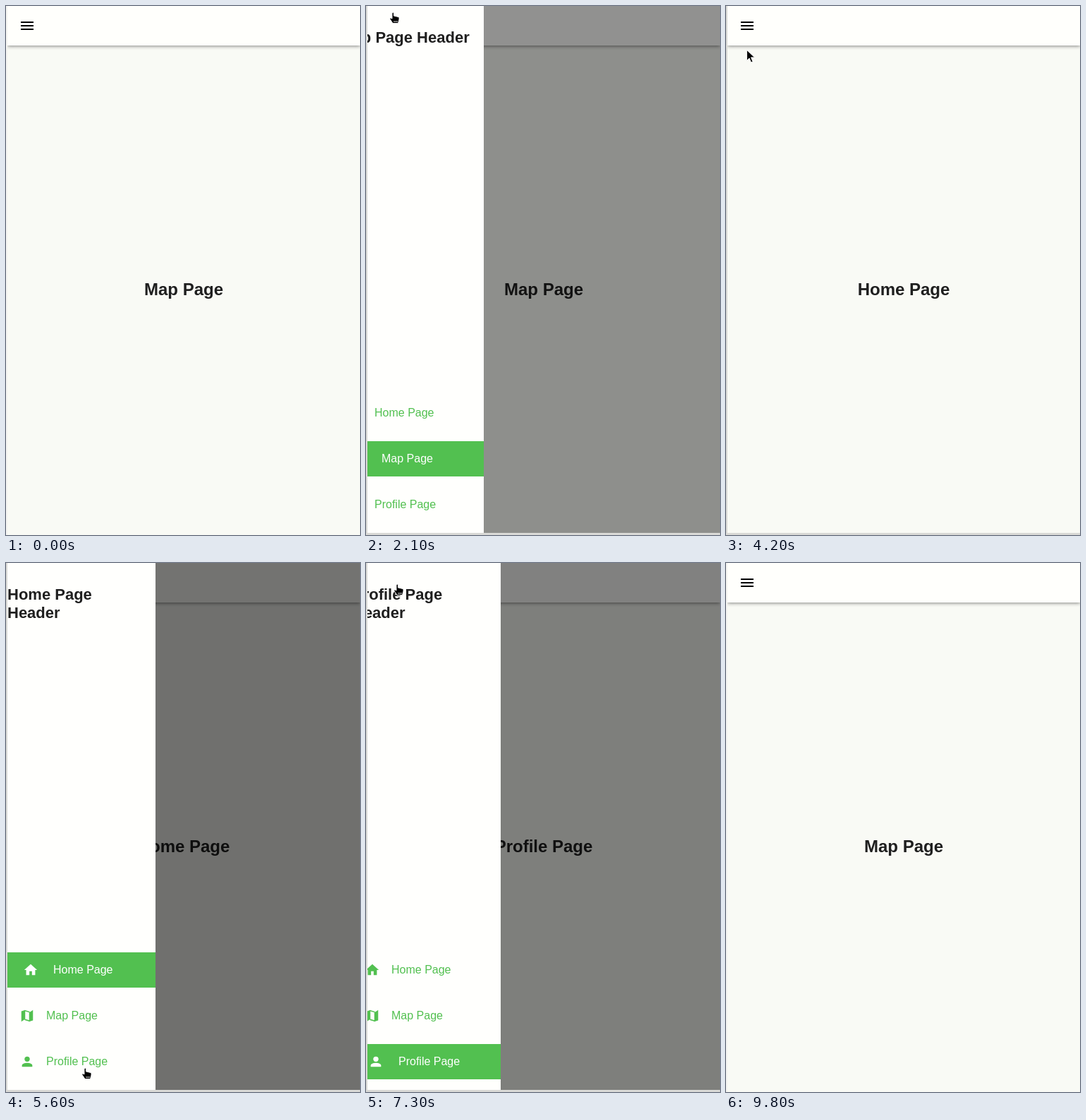
Recreate the animation shown at these times as an HTML page. Size 502x750 px, loop 10 s.

```html
<!DOCTYPE html>
<html lang="en">
<head>
<meta charset="utf-8">
<title>Side menu</title>
<style>
html, body { margin: 0; width: 100%; height: 100%; overflow: hidden; }
body { background: #f3f3f0; font-family: "Liberation Sans", Arial, sans-serif; color: #1f1f1f; }
body.framed { background: #d9d9d6; }
#app { position: absolute; left: 2px; top: 0; width: 500px; height: 750px; overflow: hidden; background: #f9faf5; }
.framed #app { height: 747px; }
#bar { position: absolute; width: 100%; height: 56px; background: #fffffc; box-shadow: 0 1px 5px rgba(0,0,0,.48); }
#bar i { position: absolute; left: 19px; width: 18px; height: 2px; background: #000; }
#title { position: absolute; top: 388px; width: 100%; text-align: center; font-weight: bold; font-size: 24px; line-height: 28px; }
#shade { position: absolute; inset: 0; background: #000; }
#drawer { position: absolute; width: 210px; height: 100%; background: #fffffd; }
#head { position: absolute; top: 31.5px; width: 196px; display: flex; justify-content: center; font-weight: bold; font-size: 22px; line-height: 26px; }
.item { position: absolute; width: 100%; height: 50px; font-size: 16px; line-height: 50px; color: #52c050; }
.item svg { position: absolute; left: 16.5px; top: 14px; width: 22px; height: 22px; fill: currentColor; }
.item span { position: absolute; left: 55px; white-space: nowrap; }
.item.on { background: #52c050; color: #fff; }
.on svg { margin-left: 5px; }
.on span { margin-left: 10px; }
#cursor { position: absolute; left: 0; top: 0; overflow: visible; width: 1px; height: 1px; }
</style>
</head>
<body>
<div id="app">
  <div id="bar"><i style="top:22px"></i><i style="top:27px"></i><i style="top:32px"></i></div>
  <div id="title"></div>
  <div id="shade"></div>
  <div id="drawer"><div id="head"></div></div>
</div>
<svg id="cursor" stroke="#fff" stroke-width=".9">
  <path id="arrow" d="M0 0V15L3.5 11.5L6 17.5L8.5 16.5L6 10.5H11Z"/>
  <g id="hand">
    <path d="M-1 1Q0-1 1.500 1V5L8 6.500Q9.500 7 9 10L7.500 15.500H0L-4 9.500Q-4.500 7-1 9Z"/>
    <path d="M1 13H7"/>
  </g>
</svg>
<script>
const LOOP = 10000, STEP = 100, SLIDE = 370, WIDTH = 210;
const ENTER = 500, LEAVE = 9800;
const $ = id => document.getElementById(id);
const clamp = k => Math.min(1, Math.max(0, k));

const icons = {
  Home: '<path d="M10 20v-6h4v6h5v-8h3L12 3 2 12h3v8z"/>',
  Map: '<path d="M3 5l6-2v14l-6 4zM15 7l6-4v16l-6 2z"/><path d="M8 3l8 2.500v1.500l-8-2.500zM8 16.500l8 2.500v2l-8-2.500z"/>',
  Profile: '<circle cx="12" cy="8" r="4"/><path d="M4 20v-2c0-5.300 16-5.300 16 0v2z"/>'
};
const pages = Object.keys(icons);
const itemTop = page => 552 + 65 * pages.indexOf(page);
const items = pages.map(page => {
  const el = document.createElement('div');
  el.className = 'item';
  el.style.top = itemTop(page) + 'px';
  el.innerHTML = `<svg viewBox="0 0 24 24">${icons[page]}</svg><span>${page} Page</span>`;
  $('drawer').append(el);
  return el;
});

// each visit opens the menu at one point, then picks a page
const visits = [
  { open: 1988, pick: 3380, page: 'Home', menu: [38, 9] },
  { open: 4780, pick: 5897, page: 'Profile', menu: [21, 8] },
  { open: 7141, pick: 8180, page: 'Map', menu: [44, 30] }
];

// the pointer heads for the menu after a pick, and for an item after opening
const moves = visits.flatMap(({ open, page, menu }, i) => [
  { start: i ? visits[i - 1].pick + 210 : ENTER, span: 880, to: menu },
  { start: open + 200, span: 620, to: [112, itemTop(page) + 34] }
]);

// cubic-bezier(.25, .8, .25, 1)
function ease(x) {
  if (x <= 0 || x >= 1) return clamp(x);
  const curve = (a, b, s) => 3 * a * s * (1 - s) ** 2 + 3 * b * s * s * (1 - s) + s ** 3;
  let s = .5;
  for (let half = .25; half > 1e-6; half /= 2) s += curve(.25, .25, s) < x ? half : -half;
  return curve(.8, 1, s);
}

function pointerAt(t) {
  return moves.reduce((from, { start, span, to }) => {
    const k = 1 - (1 - clamp((t - start) / span)) ** 2;
    return from.map((v, i) => v + (to[i] - v) * k);
  }, [500, 110]);
}

function draw(t) {
  let open = 0, page = 'Map';
  for (const v of visits) {
    open += ease((t - v.open) / SLIDE) - ease((t - v.pick) / SLIDE);
    if (t >= v.pick) page = v.page;
  }
  document.body.className = t >= 1800 && t < LEAVE ? 'framed' : '';
  $('title').textContent = page + ' Page';
  $('head').textContent = page + ' Page Header';
  items.forEach((el, i) => el.classList.toggle('on', pages[i] === page));
  $('shade').style.opacity = .55 * open;
  $('drawer').style.transform = `translateX(${Math.round((open - 1) * WIDTH)}px)`;

  const [x, y] = pointerAt(t);
  const hand = (x < 54 && y < 48) || (open > .5 && y > 550);
  $('cursor').style.display = t >= ENTER && t < LEAVE ? 'block' : 'none';
  $('cursor').style.transform = `translate(${x}px, ${y}px)`;
  $('hand').style.display = hand ? '' : 'none';
  $('arrow').style.display = hand ? 'none' : '';
}

const began = performance.now();
function tick() {
  const t = (performance.now() - began) % LOOP;
  draw(Math.floor(t / STEP) * STEP);
  requestAnimationFrame(tick);
}
tick();
</script>
</body>
</html>
```
